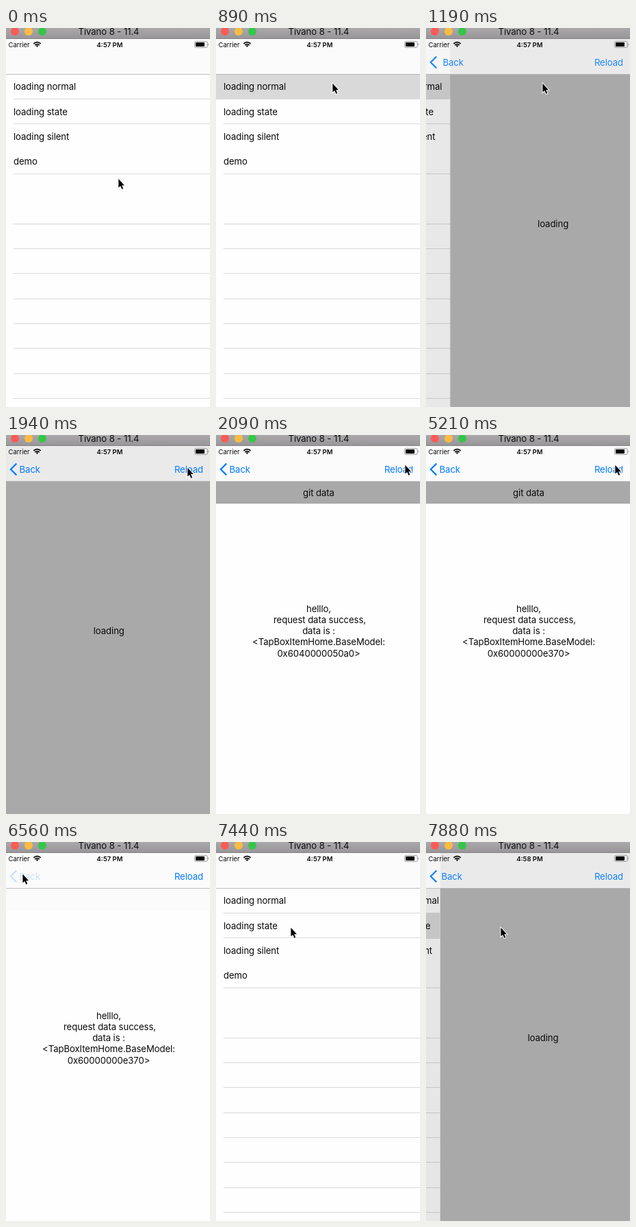
An HTML page that plays this animation: 298 px wide and 552 px high, repeating every 8 s.

```html
<!DOCTYPE html>
<html lang="en">
<head>
<meta charset="utf-8">
<title>Loading demo</title>
<style>
  html, body { margin: 0; width: 100%; height: 100%; overflow: hidden; background: #fff; }
  svg { display: block; width: 298px; height: 552px; }
  text { font: 13.2px Inter, Roboto, sans-serif; letter-spacing: -.1px; fill: #0a0a0a; }
  .mid { text-anchor: middle; }
  .blue { fill: #007aff; }
  .small { font-size: 9.5px; letter-spacing: 0; }
  #clock { font-weight: 600; }
  #title { font-size: 13.2px; fill: #111; }
</style>
</head>
<body>
<svg viewBox="0 0 298 552">
  <defs>
    <linearGradient id="chrome" x2="0" y2="1">
      <stop stop-color="#aaa8aa"/><stop offset="1" stop-color="#979598"/>
    </linearGradient>
  </defs>
  <rect width="298" height="552" fill="#fefefe"/>

  <g id="list">
    <rect id="mark" y="67" width="298" height="37" fill="#d9d9d9"/>
  </g>
  <rect id="dim" width="298" height="552"/>

  <g id="detail">
    <rect width="298" height="552" fill="#fefefe"/>
    <rect y="68" width="298" height="32" fill="#fbfbfb"/>
    <g id="bar">
      <rect y="68" width="298" height="32" fill="#a9a9a9"/>
      <text id="barText" class="mid" x="150" y="88.7"></text>
    </g>
    <g id="result"></g>
    <g id="cover">
      <rect width="298" height="552" fill="#a9a9a9"/>
      <text class="mid" x="150.3" y="290">loading</text>
    </g>
  </g>

  <rect y="16" width="298" height="52" fill="#fafafa" opacity=".8"/>
  <rect y="67" width="298" height="1" opacity=".24"/>
  <g id="back">
    <path d="M15.3 41.6L6.9 50L15.3 58.4" fill="none" stroke="#007aff" stroke-width="2.2"/>
    <text id="backText" class="blue" y="54.8">Back</text>
  </g>
  <text id="reload" class="blue" x="288" y="54.8" text-anchor="end">Reload</text>

  <text class="small" x="3.6" y="27.6">Carrier</text>
  <g fill="none" stroke="#000" stroke-width="1.7">
    <path d="M40.3 22.9Q45.5 18.3 50.7 22.9M42.2 25Q45.5 22.2 48.8 25"/>
    <path d="M43.6 25.8Q45.5 24.5 47.4 25.8L45.5 28Z" fill="#000" stroke="none"/>
  </g>
  <text id="clock" class="small mid" x="151.5" y="27.6"></text>
  <rect x="275.5" y="19.6" width="18.8" height="8.8" rx="2" fill="none" stroke="#808080" stroke-width=".8"/>
  <rect x="277" y="21.1" width="13" height="5.8" rx=".8"/>
  <path d="M295.3 22.5Q297.2 24 295.3 25.5Z" fill="#808080"/>

  <rect width="298" height="16" fill="url(#chrome)"/>
  <rect y="15" width="298" height="1" fill="#858386"/>
  <circle cx="13" cy="5" r="6" fill="#fc5b57"/>
  <circle cx="33" cy="5" r="6" fill="#fdbc40"/>
  <circle cx="53" cy="5" r="6" fill="#33c748"/>
  <text id="title" class="mid" x="150" y="10">Tivano 8 - 11.4</text>

  <path id="cursor" d="M.4 .8V13.6L3.2 11L5.4 15.8L7.3 15L5.2 10.2H9Z"
        stroke="#fff" stroke-width="1.8" paint-order="stroke"/>
</svg>
<script>
const LOOP = 8000, TICK = 148.4, WIDTH = 298;
const $ = id => document.getElementById(id);
const set = (id, name, value) => $(id).setAttribute(name, value);
const clamp = v => Math.max(0, Math.min(1, v));

function add(parent, tag, attrs, text = '') {
  const el = document.createElementNS('http://www.w3.org/2000/svg', tag);
  for (const name in attrs) el.setAttribute(name, attrs[name]);
  el.textContent = text;
  $(parent).append(el);
  return el;
}

['loading normal', 'loading state', 'loading silent', 'demo'].forEach((label, i) =>
  add('list', 'text', { x: 11, y: 90.4 + i * 36.3 }, label));
for (let i = 1; i < 14; i++) {
  if (i === 3 || i === 5) continue;
  add('list', 'rect', { x: 11, y: Math.floor(67.3 + i * 36.33), width: 600, height: 1, fill: '#dad9dc' });
}

const lines = ['helllo,', 'request data success,', 'data is :', '<TapBoxItemHome.BaseModel:', ''].map((s, i) =>
  add('result', 'text', { class: 'mid', x: i === 1 ? 151.5 : 150, y: 257.6 + i * 16.27 }, s));

// Pointer stops: leave time, arrival time, x, y
const moves = [
  [370, 800, 170, 80],
  [1450, 2050, 276, 43],
  [5580, 6380, 24, 46],
  [6700, 7415, 109, 124]
];

function pointer(t) {
  let x = 164, y = 219;
  for (const [from, to, nx, ny] of moves) {
    const k = clamp((t - from) / (to - from)), e = k * k * (3 - 2 * k);
    x += (nx - x) * e;
    y += (ny - y) * e;
  }
  return [x, y];
}

// Critically damped spring, 1 at the start and settling at 0
function spring(dt) {
  const u = Math.max(0, dt) * .018;
  return (1 + u) * Math.exp(-u);
}

function pageOffset(t) {
  if (t < 6600) return spring(t - 983);
  return t < 7624 ? 1 - spring(t - 6600) : spring(t - 7624);
}

// Button dims on touch, then fades back after release
const press = (t, down) => t < down ? 1 : .2 + .8 * clamp((t - down - 120) / 320);

function draw(t) {
  const off = pageOffset(t), p = 1 - off, x = off * WIDTH;
  const second = t >= 7500;

  set('list', 'transform', `translate(${-.3 * WIDTH * p})`);
  set('mark', 'y', second ? 104 : 67);
  set('mark', 'opacity', second ? +(t >= 7600) : t < 850 ? 0 : t < 6600 ? 1 : p);
  set('dim', 'opacity', .1 * p);

  set('detail', 'transform', `translate(${x})`);
  set('cover', 'visibility', t < 2000 || second ? 'visible' : 'hidden');
  set('bar', 'visibility', t < 6400 ? 'visible' : 'hidden');
  const busy = t >= 2480 && t < 3550 || t >= 4120 && t < 5150;
  $('barText').textContent = busy ? 'loading' : 'git data';
  lines[4].textContent = t < 3550 ? '0x6040000050a0>' : t < 5150 ? '0x60800000b2d0>' : '0x60000000e370>';

  set('back', 'opacity', t >= 6400 && !second ? .2 * p : p);
  set('backText', 'x', 19.6 + .14 * x);
  set('reload', 'opacity', p * press(t, t < 3900 ? 2360 : 4000));
  $('clock').textContent = t < 7700 ? '4:57 PM' : '4:58 PM';
  set('cursor', 'transform', `translate(${pointer(t)})`);
}

// The screen refreshes in steps, like a low-rate recording
function run(now) {
  draw(Math.floor(now % LOOP / TICK) * TICK);
  requestAnimationFrame(run);
}
run(performance.now());
</script>
</body>
</html>
```
